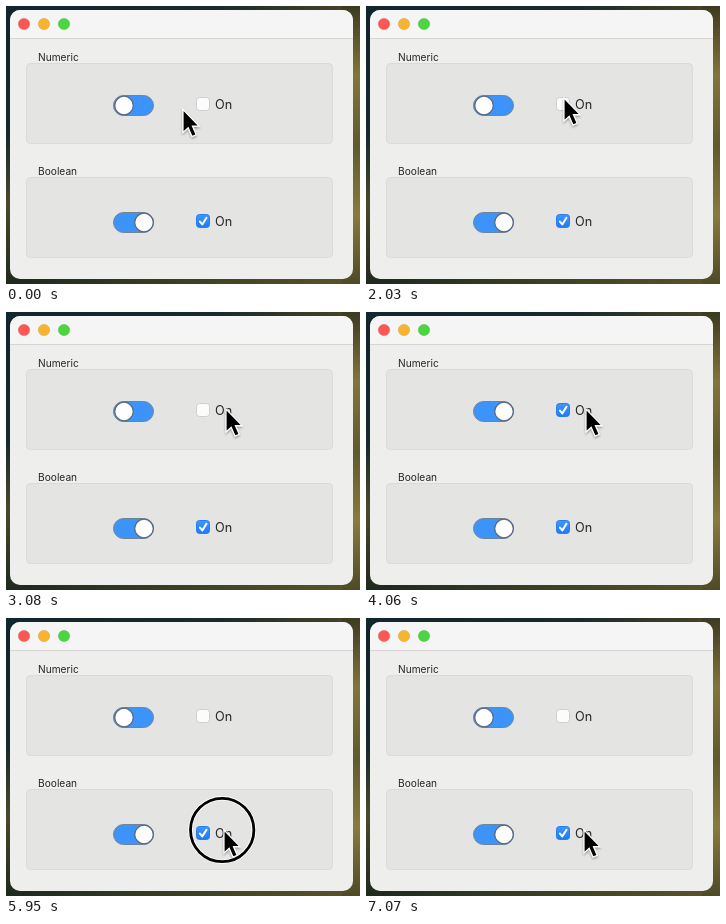
These frames come from a looping animation (354 by 278 pixels, 7.35 s). An HTML page:

```html
<!DOCTYPE html>
<html lang="en">
<head>
<meta charset="utf-8">
<title>Toggle demo</title>
<style>
  html, body { margin: 0; width: 100%; height: 100%; overflow: hidden; background: #14211f; }
  svg { display: block; width: 354px; height: 278px; }
  text { font-family: Inter, "Open Sans", sans-serif; fill: #262626; }
  .title { font-size: 10.2px; }
  .label { font-size: 12.7px; }
  .track { fill: #3c94fb; stroke: #718397; }
  .thumb { fill: #fff; stroke: #596b80; stroke-width: 1.3; }
  .box { fill: #fcfcfc; stroke: #cecece; }
  .on .box { fill: url(#check); stroke: #277df0; }
  .tick { fill: none; stroke: #fff; stroke-width: 2; stroke-linecap: round; stroke-linejoin: round; visibility: hidden; }
  .on .tick { visibility: visible; }
  .on .thumb { transform: translateX(20px); }
</style>
</head>
<body>
<svg viewBox="0 0 354 278">
  <defs>
    <linearGradient id="left" x2="0" y2="1">
      <stop offset="0" stop-color="#10242b"/>
      <stop offset=".45" stop-color="#172a2a"/>
      <stop offset=".7" stop-color="#4a4a2a"/>
      <stop offset="1" stop-color="#20291f"/>
    </linearGradient>
    <linearGradient id="right" x2="0" y2="1">
      <stop offset="0" stop-color="#3d3a22"/>
      <stop offset=".25" stop-color="#85743a"/>
      <stop offset=".5" stop-color="#5f5a2c"/>
      <stop offset=".75" stop-color="#8a7a3c"/>
      <stop offset="1" stop-color="#4d4a26"/>
    </linearGradient>
    <linearGradient id="top">
      <stop offset="0" stop-color="#12262d"/>
      <stop offset=".6" stop-color="#1a2a2c"/>
      <stop offset="1" stop-color="#4a4526"/>
    </linearGradient>
    <linearGradient id="bottom">
      <stop offset="0" stop-color="#1c2721"/>
      <stop offset=".5" stop-color="#3b4024"/>
      <stop offset="1" stop-color="#5a5429"/>
    </linearGradient>
    <linearGradient id="check" x2="0" y2="1">
      <stop offset="0" stop-color="#3f97fc"/>
      <stop offset="1" stop-color="#217af3"/>
    </linearGradient>
    <filter id="shade" x="-40%" y="-30%" width="200%" height="180%">
      <feDropShadow dx="0" dy="1.5" stdDeviation="1.1" flood-opacity=".35"/>
    </filter>
    <g id="panel">
      <rect x="20.5" y="57.5" width="306" height="80" rx="4" fill="#e4e4e3" stroke="#dadad9"/>
      <text class="label" x="209" y="103">On</text>
    </g>
  </defs>

  <rect width="354" height="16" fill="url(#top)"/>
  <rect y="262" width="354" height="16" fill="url(#bottom)"/>
  <rect y="10" width="16" height="268" fill="url(#left)"/>
  <rect x="336" width="18" height="278" fill="url(#right)"/>

  <rect x="4" y="4" width="343" height="269" rx="10" fill="#eeeeed"/>
  <path d="M4 32V14a10 10 0 0 1 10-10H337a10 10 0 0 1 10 10V32Z" fill="#f6f5f5"/>
  <path d="M4 32.5H347" stroke="#d5d4d3"/>
  <g stroke-opacity=".12" stroke="#000" stroke-width=".7">
    <circle cx="18" cy="18" r="5.8" fill="#fc5753"/>
    <circle cx="38" cy="18" r="5.8" fill="#f8b42e"/>
    <circle cx="58" cy="18" r="5.8" fill="#4bd63f"/>
  </g>

  <g id="numeric">
    <use href="#panel"/>
    <text class="title" x="32" y="55">Numeric</text>
    <rect class="track" x="107.5" y="89.5" width="40" height="20" rx="10"/>
    <circle class="thumb" cx="118" cy="99.5" r="9.3"/>
    <rect class="box" x="190.5" y="91.5" width="13" height="13" rx="3"/>
    <path class="tick" d="M193.9 98.6l2.4 2.8 4.2-6.6"/>
  </g>
  <g id="boolean">
    <use href="#panel" y="114"/>
    <text class="title" x="32" y="169">Boolean</text>
    <rect x="205" y="206" width="26" height="18" fill="#e4e4e3"/>
    <text class="label" x="209" y="220">On</text>
    <rect class="track" x="107.5" y="206.5" width="40" height="20" rx="10"/>
    <circle class="thumb" cx="118" cy="216.5" r="9.3"/>
    <rect class="box" x="190.5" y="208.5" width="13" height="13" rx="3"/>
    <path class="tick" d="M193.9 215.6l2.4 2.8 4.2-6.6"/>
  </g>

  <g id="ring" fill="none">
    <circle r="31.7" stroke="#fff" stroke-width="4.6"/>
    <circle r="31.7" stroke="#000" stroke-width="2.8"/>
  </g>
  <path id="cursor" d="M0 0V23L5.2 18.2 9 27 13.2 25.2 9.4 16.6H16Z" fill="#000" stroke="#fff" stroke-width="1.2" filter="url(#shade)"/>
</svg>
<script>
  const LOOP = 7350, STEP = 70;
  const $ = id => document.getElementById(id);

  // Pointer tip: [time, x, y]
  const path = [
    [0, 177, 103.5], [560, 132, 103], [980, 132, 103], [1190, 124, 102],
    [1400, 124, 102], [1470, 116, 106], [1750, 116, 106], [2030, 198, 92],
    [2310, 241, 100], [2380, 241, 100], [2660, 234, 104], [2730, 234, 104],
    [3080, 220, 97], [4690, 220, 97], [5040, 194, 213], [5110, 194, 213],
    [5320, 211, 213], [5460, 211, 213], [5600, 218, 212], [LOOP, 218, 212]
  ];

  // Presses: [start, end, control]
  const clicks = [
    [770, 980, "numeric"], [1190, 1470, "numeric"],
    [3780, 4060, "numeric"], [4130, 4340, "numeric"],
    [5740, 6230, "boolean"], [6720, 7070, "boolean"]
  ];

  const ease = k => k * k * (3 - 2 * k);

  function pointer(t) {
    const i = path.findIndex(p => p[0] > t);
    const [t0, x0, y0] = path[i - 1], [t1, x1, y1] = path[i];
    const k = ease((t - t0) / (t1 - t0));
    return [x0 + (x1 - x0) * k, y0 + (y1 - y0) * k];
  }

  function draw(t) {
    const [x, y] = pointer(t);
    $("cursor").setAttribute("transform", `translate(${x} ${y})`);

    const state = { numeric: false, boolean: true };
    let size = 0, alpha = 0;
    for (const [start, end, id] of clicks) {
      if (t >= end - 2 * STEP) state[id] = !state[id];
      if (t >= start && t < end) {
        size = Math.min(1, (t - start + STEP) / (2 * STEP));
        alpha = Math.min(1, (end - t) / (2 * STEP));
      }
    }
    for (const id in state) $(id).classList.toggle("on", state[id]);
    $("ring").setAttribute("transform", `translate(${x - 1.8} ${y}) scale(${size})`);
    $("ring").setAttribute("opacity", alpha);
  }

  const begin = performance.now();
  function tick() {
    const t = (performance.now() - begin) % LOOP;
    draw(Math.floor(t / STEP) * STEP);
    requestAnimationFrame(tick);
  }
  draw(0);
  requestAnimationFrame(tick);
</script>
</body>
</html>
```
